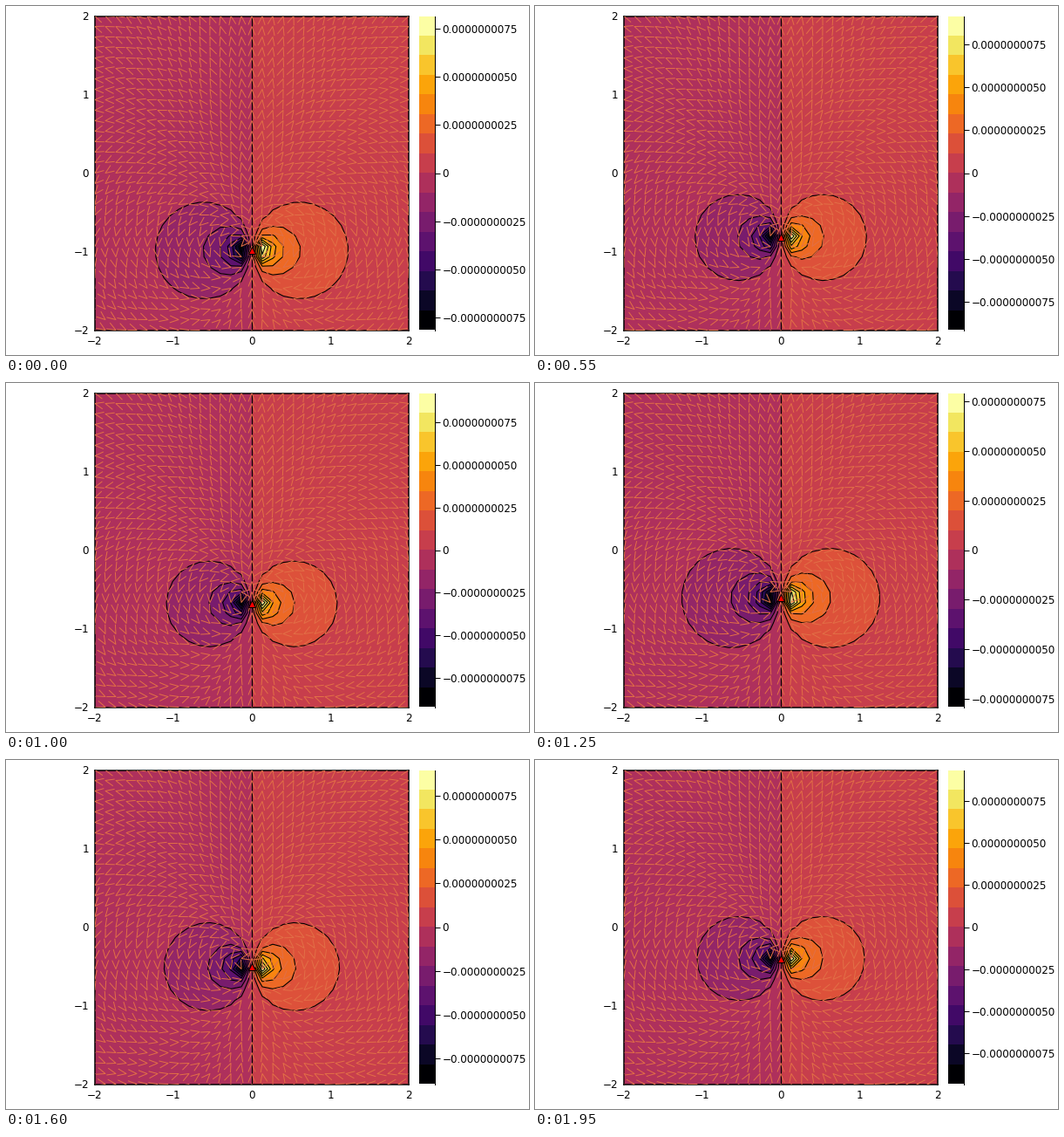
These frames come from a looping animation (600 by 400 pixels, 2 s). A matplotlib script:

```python
import matplotlib.pyplot as plt
import numpy as np
from matplotlib.animation import FuncAnimation
from matplotlib.collections import LineCollection
from matplotlib.colors import ListedColormap

W, H, DPI = 600, 400, 100
PX = 72 / DPI            # points per pixel
FRAMES, INTERVAL = 40, 50
UNIT = 4 / 360           # data units per pixel
STRENGTH = 1.25          # dipole strength, in 1e-9
BANDS = 16
HEAD_LEN, HEAD_HALF = 10 * UNIT, 4 * UNIT

plt.rcParams["font.family"] = "DejaVu Sans"
plt.rcParams["font.size"] = 12 * PX

cmap = ListedColormap(plt.get_cmap("inferno")(np.linspace(0, 1, BANDS)))
grid = np.linspace(-2, 2, 31)
grid[15] = 0
X, Y = np.meshgrid(grid, grid)


def pixel_axes(fig, left, top, width, height):
    return fig.add_axes([left / W, 1 - (top + height) / H, width / W, height / H])


fig = plt.figure(figsize=(W / DPI, H / DPI), dpi=DPI, facecolor="white")

ax = pixel_axes(fig, 102, 11.5, 360, 360)
ax.set(xlim=(-2, 2), ylim=(-2, 2))
ticks = range(-2, 3)
labels = [str(t).replace("-", "\u2212") for t in ticks]
ax.set_xticks(ticks, labels)
ax.set_yticks(ticks, labels)
ax.tick_params(length=0)
ax.tick_params(axis="x", pad=6 * PX)
ax.tick_params(axis="y", pad=7 * PX)
for spine in ax.spines.values():
    spine.set_linewidth(1.5 * PX)

arrows = LineCollection([], colors="#e26f46", linewidths=PX, zorder=3)
ax.add_collection(arrows, autolim=False)
swimmer, = ax.plot([0], [-1], "^", ms=8 * PX, mfc="red", mec="black",
                   mew=PX, zorder=4)

bar = pixel_axes(fig, 474, 11.5, 18, 360)
bar.imshow(np.arange(BANDS)[:, None], cmap=cmap, origin="lower",
           extent=(0, 1, -1, 1), aspect="auto", interpolation="nearest")
bar.set_xticks([])
bar.yaxis.tick_right()
bar.tick_params(axis="y", length=6 * PX, width=PX, pad=2.5 * PX)
for side in ("left", "top", "bottom"):
    bar.spines[side].set_visible(False)
bar.spines["right"].set_linewidth(PX)

bar_values = np.arange(-3, 4) * 2.5
bar_labels = [f"{v * 1e-9:.10f}".replace("-", "\u2212") if v else "0"
              for v in bar_values]
contours = []


def arrow_heads(dx, dy):
    """Open V heads with their tips on the grid, along the dipole flow."""
    u, v = 2 * dx * dy, dy**2 - dx**2
    size = np.hypot(u, v) + 1e-15
    u, v = u / size, v / size

    def arm(side):
        return (X - HEAD_LEN * u - side * HEAD_HALF * v,
                Y - HEAD_LEN * v + side * HEAD_HALF * u)

    heads = np.array([arm(1), (X, Y), arm(-1)])
    return heads.reshape(3, 2, -1).transpose(2, 0, 1)


def update(i):
    y0 = -1 + 0.015 * (i + 1)
    dx, dy = X, Y - y0
    field = STRENGTH * dx / (dx**2 + dy**2 + 1e-12)
    peak = field.max()
    levels = np.linspace(-peak, peak, BANDS + 1)
    levels[BANDS // 2] = 0

    while contours:
        contours.pop().remove()
    edges = levels.copy()
    edges[[0, -1]] *= 1.0001
    contours.append(ax.contourf(X, Y, field, edges, zorder=1,
                                colors=list(cmap.colors)))
    contours.append(ax.contour(X, Y, field, levels[1:-1], colors="black",
                               linewidths=1.1 * PX, linestyles="solid", zorder=2))

    arrows.set_segments(arrow_heads(dx, dy))
    swimmer.set_data([0], [y0])
    bar.set_yticks(bar_values / peak, bar_labels)
    bar.set_ylim(-1, 1)
    return []


anim = FuncAnimation(fig, update, frames=FRAMES, interval=INTERVAL,
                     init_func=lambda: [], repeat=True, repeat_delay=0, blit=False)
plt.show()
```
